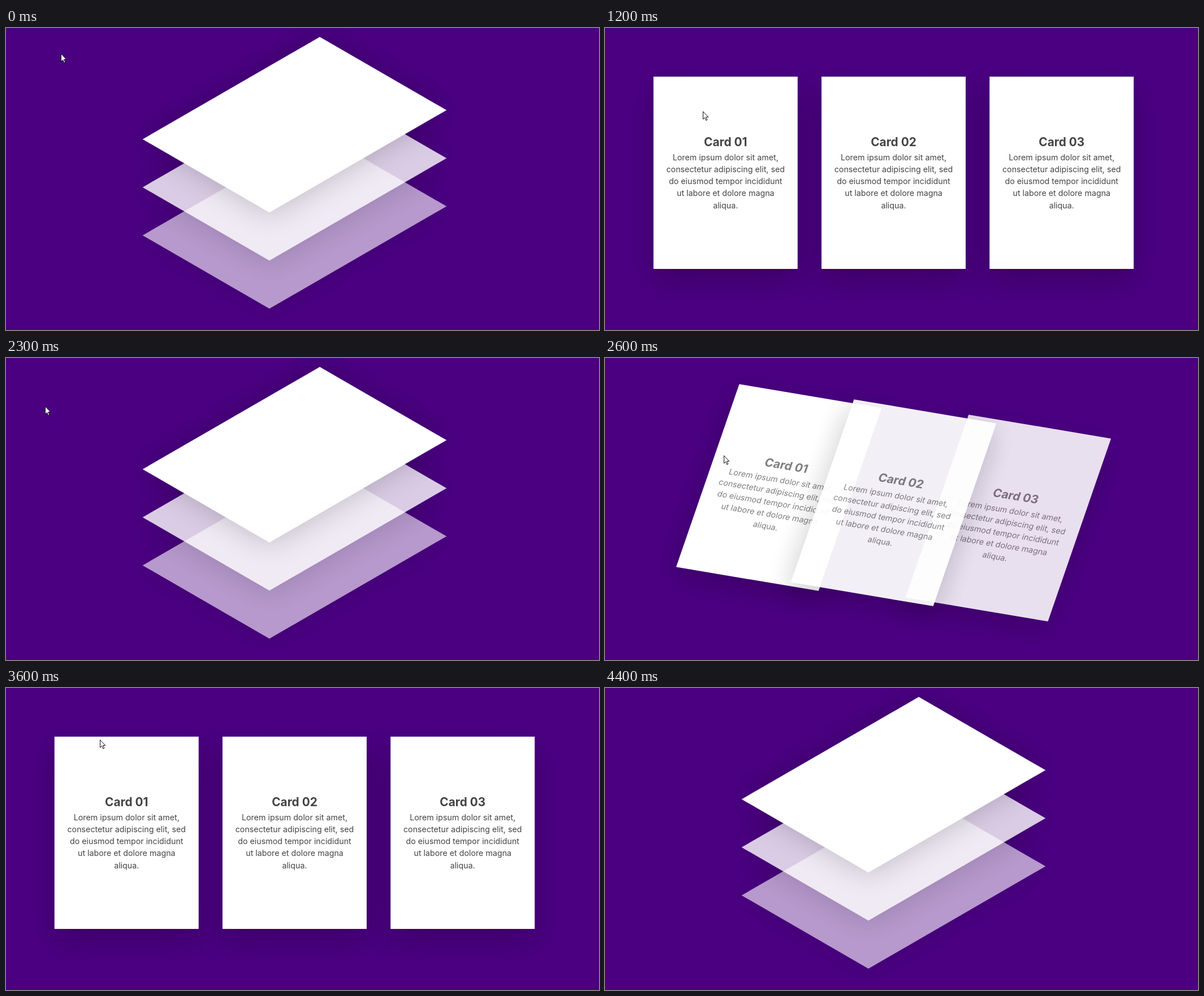
These frames come from a looping animation (1049 by 534 pixels, 4.8 s). An HTML page:

```html
<!DOCTYPE html>
<html lang="en">
<head>
<meta charset="utf-8">
<style>
html, body { margin: 0; width: 100%; height: 100%; overflow: hidden; background: #4b0082; }
.card {
  position: absolute; left: 383px; top: 86px; width: 255px; height: 340px;
  background: #fff; font-family: Poppins, Inter, sans-serif;
  text-align: center; white-space: nowrap; color: #444;
}
.card div { padding-top: 101px; }
h2 { margin: 0; font-size: 20.8px; line-height: 30.6px; font-weight: 700; }
p { margin: 0; font-size: 14.25px; line-height: 21.25px; }
#cursor { position: absolute; left: 0; top: 0; z-index: 9; overflow: visible; }
</style>
</head>
<body>
<svg id="cursor" width="12" height="18">
  <path d="M.5.7V14.3L3.6 11.4 5.7 16.4 7.8 15.5 5.7 10.6H9.8Z" fill="#fff" stroke="#111"/>
</svg>
<script>
const LOOP = 4800, STEP = 100;
const cursor = document.getElementById('cursor');
const cards = [1, 2, 3].map(n => {
  const card = document.createElement('div');
  card.className = 'card';
  card.innerHTML = `<div><h2>Card 0${n}</h2><p>Lorem ipsum dolor sit amet,<br>
    consectetur adipiscing elit, sed<br>do eiusmod tempor incididunt<br>
    ut labore et dolore magna<br>aliqua.</p></div>`;
  document.body.append(card);
  return card;
});

// Times at which the pointer enters and leaves, in turn
const turns = [331, 1530, 2400, 3798];
// Pointer waypoints: time, x, y
const waypoints = [
  [0, 97, 45], [700, 330, 212], [1200, 173, 147], [1600, 19, 80],
  [2200, 19, 80], [2300, 69, 85], [3000, 398, 288], [3900, 50, -7]
];

const mix = (a, b, k) => a + (b - a) * k;

// CSS "ease": solve the curve's x for s by bisection, then return its y
function ease(x) {
  if (x >= 1) return 1;
  let low = 0, high = 1;
  for (let i = 0; i < 24; i++) {
    const s = (low + high) / 2;
    if (.75 * s * (1 - s) + s ** 3 < x) low = s; else high = s;
  }
  return .3 * low * (1 - low) ** 2 + 3 * low ** 2 * (1 - low) + low ** 3;
}

// The picture advances in steps, with two longer holds
function stepTime(ms) {
  const t = Math.floor(ms / STEP) * STEP;
  if (t >= 700 && t < 1000) return 700;
  if (t >= 3700 && t < 3900) return 3850;
  return t;
}

function drawCards(t) {
  const count = turns.filter(turn => turn <= t).length;
  const stacking = count % 2 === 0;
  const start = count ? turns[count - 1] : -Infinity;
  const progress = duration => {
    const e = ease((t - start) / duration);
    return stacking ? e : 1 - e;
  };
  const move = progress(500), fade = progress(stacking ? 300 : 500);
  cards.forEach((card, i) => {
    const side = i - 1, text = card.firstChild;
    card.style.transform =
      `translate(${side * 297.25 * (1 - move)}px, ${side * 85 * move}px) ` +
      `rotate(${40 * move}deg) skew(${-20 * move}deg, ${-10 * move}deg)`;
    card.style.boxShadow = `0 ${21 * (1 - fade)}px 50px rgba(0, 0, 0, .22)`;
    card.style.zIndex = Math.round(move * (3 - i));
    card.style.opacity = 1 - .2 * i * fade;
    text.style.opacity = 1 - fade;
    text.style.transform = `translateY(${42.5 * fade}px)`;
  });
}

function drawCursor(t) {
  const hidden = (t >= 100 && t < 300) || t >= 4000;
  cursor.style.display = hidden ? 'none' : 'block';
  if (hidden) return;
  const next = waypoints.findIndex(([time]) => time >= t) || 1;
  const [t0, x0, y0] = waypoints[next - 1], [t1, x1, y1] = waypoints[next];
  const k = (t - t0) / (t1 - t0);
  cursor.style.transform =
    `translate(${Math.round(mix(x0, x1, k))}px, ${Math.round(mix(y0, y1, k))}px)`;
}

function draw() {
  const t = stepTime(performance.now() % LOOP);
  drawCards(t);
  drawCursor(t);
  requestAnimationFrame(draw);
}
draw();
</script>
</body>
</html>
```
